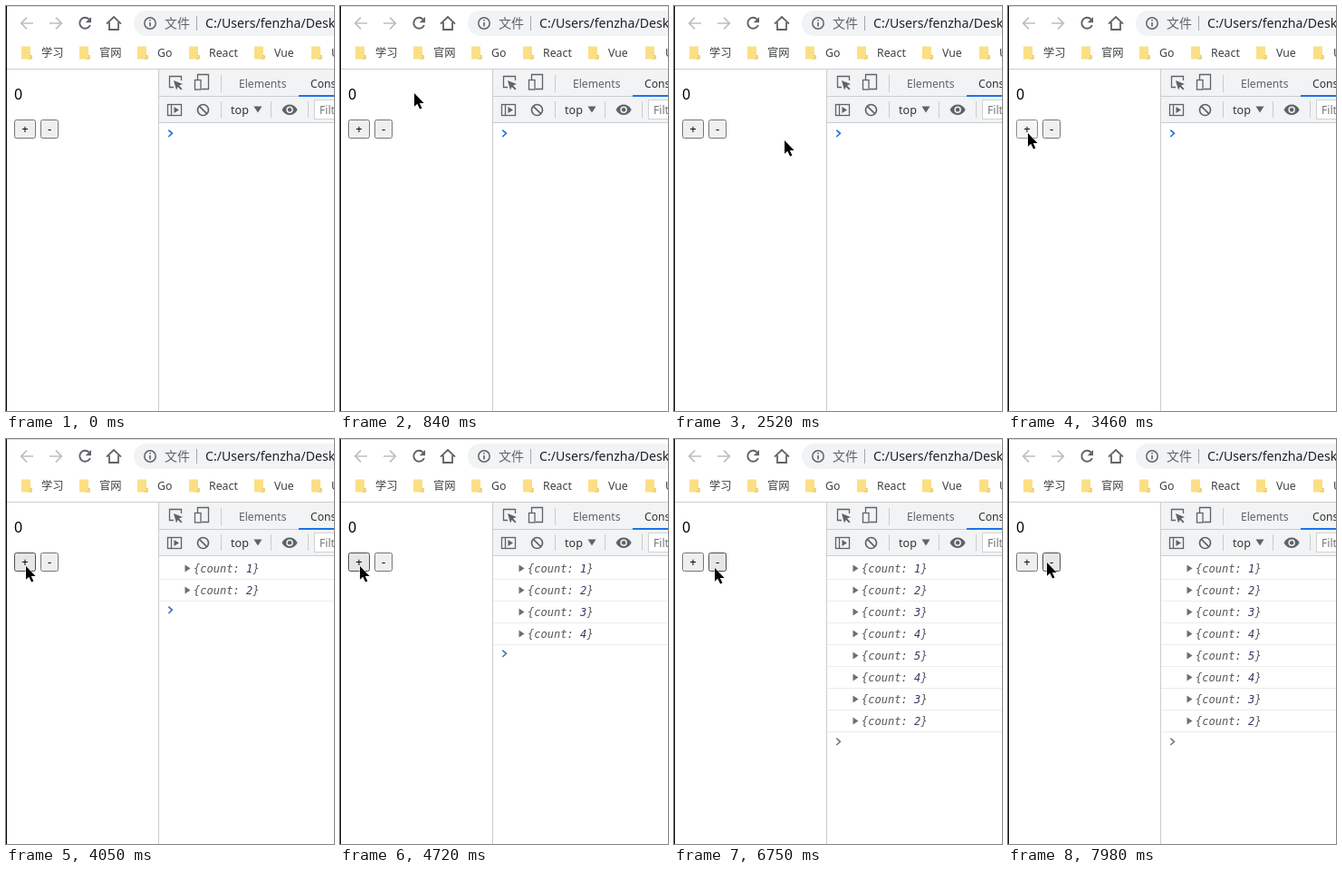
Write an HTML page that moves like this. It is 362 by 446 pixels and loops after 8 s.

```html
<!DOCTYPE html>
<html lang="zh">
<head>
<meta charset="utf-8">
<title>Counter</title>
<style>
html, body { margin: 0; width: 100%; height: 100%; overflow: hidden; background: #fff; }
svg { display: block; width: 100vw; height: 100vh; }
text { font-family: "Noto Sans", "Open Sans", "Noto Sans CJK SC", "Noto Sans CJK", sans-serif; white-space: pre; }
.ui { font-size: 12.1px; fill: #5f6368; }
.mark { font-size: 12.3px; fill: #3c4043; }
.btn rect { fill: #efefef; stroke: #767676; }
.btn.hover rect { fill: #e6e6e6; stroke: #4f4f4f; }
.btn.down rect { fill: #f5f5f5; stroke: #8d8d8d; }
.btn text { font-size: 13px; text-anchor: middle; }
.log text { font: italic 12.07px "DejaVu Sans Mono", "Noto Sans Mono", monospace; fill: #565656; }
.log tspan { fill: #3a3a68; }
.line { fill: none; stroke: #5f6368; }
</style>
</head>
<body>
<svg viewBox="0 0 362 446" preserveAspectRatio="none">
  <rect width="362" height="446" fill="#fff"/>

  <!-- browser toolbar -->
  <rect width="362" height="1" fill="#dadada"/>
  <g class="line" stroke-width="1.7">
    <path stroke="#bcbec1" d="M30 19H17M23 12.7L16.7 19L23 25.3"/>
    <path stroke="#bcbec1" d="M48 19H61M55 12.7L61.3 19L55 25.3"/>
  </g>
  <circle id="halo" cx="87.5" cy="19.5" r="14" fill="#e9eaec"/>
  <circle id="ripple" cx="92" cy="18" r="12" fill="#d9dbde"/>
  <path class="line" stroke-width="1.9" d="M91.6 14.6A6 6 0 1 0 92.9 21"/>
  <path fill="#5f6368" d="M94 12V18.3H87.7Z"/>
  <path class="line" stroke-width="1.8" d="M111 19.7L119 12L127 19.7M114 18V26H124V18"/>
  <path fill="#f1f3f4" d="M362 5H155A14 14 0 0 0 155 33H362Z"/>
  <circle class="line" cx="159" cy="19" r="6.2" stroke-width="1.5"/>
  <path class="line" stroke-width="1.6" d="M159 18V22.6M159 15V16.6"/>
  <text x="175" y="24" font-size="14" fill="#5f6368">文件</text>
  <rect x="210" y="11" width="1" height="16" fill="#a4a7ab"/>
  <text x="220" y="24" font-size="14.1" fill="#202124">C:/Users/fenzha/Desktop/</text>
  <g id="marks"></g>
  <rect y="69" width="362" height="1" fill="#cfcfcf"/>

  <!-- page -->
  <text x="9" y="103" font-size="16" fill="#000">0</text>
  <g class="btn" id="plus"><rect x="9.5" y="125.5" width="23" height="20" rx="2"/><text x="21" y="140">+</text></g>
  <g class="btn" id="minus"><rect x="38.5" y="125.5" width="19" height="20" rx="2"/><text x="48" y="140">-</text></g>

  <!-- developer tools -->
  <rect x="168" y="70" width="194" height="59" fill="#f1f3f4"/>
  <rect x="168" y="70" width="1" height="376" fill="#cacdd1"/>
  <path stroke="#cacdd1" d="M169 99.5H362M169 128.5H362M237.5 76V95M237.5 105V123M292.5 105V123M333.5 105V123"/>
  <rect x="323" y="98" width="39" height="2" fill="#1a73e8"/>
  <g class="line" stroke-width="1.3">
    <path d="M185 89.5H180.5V77.5H193.5V82"/>
    <path d="M211.5 81V75.5H223.5V91.5H216"/>
    <rect x="208.5" y="81.5" width="6.5" height="10.5"/>
    <rect x="178.5" y="108.5" width="15" height="12"/>
    <path d="M182.5 108.5V120.5"/>
    <circle cx="217.5" cy="114.5" r="6" stroke-width="1.7"/>
    <path stroke-width="1.7" d="M213.3 110.3L221.7 118.7"/>
  </g>
  <g fill="#5f6368">
    <path d="M185 82L195 86L191 87.6L194.5 91.2L193.2 92.4L189.7 88.9L188 92.5Z"/>
    <path d="M185.5 111V118L191 114.5Z"/>
    <path d="M273.5 110.5H282.5L278 117.5Z"/>
    <path d="M304.5 114.3C308 106.6 318 106.6 321.7 114.3C318 122 308 122 304.5 114.3Z"/>
  </g>
  <circle cx="313.1" cy="114.3" r="3" fill="#5f6368" stroke="#f1f3f4" stroke-width="1.5"/>
  <text class="ui" x="257" y="90">Elements</text>
  <text class="ui" x="336" y="90" style="fill:#333">Console</text>
  <text class="ui" x="248" y="119" style="fill:#333;font-size:12.6px">top</text>
  <rect x="340.5" y="103.5" width="40" height="21" fill="#fff" stroke="#d0d3d6"/>
  <text class="ui" x="346" y="119" style="fill:#757575">Filter</text>

  <g id="logs"></g>
  <path id="prompt" fill="none" stroke-width="1.6" d="M179.3 -3.7L183.4 0L179.3 3.7"/>

  <rect width="1" height="446" fill="#000"/>
  <path id="cursor" d="M0 0V14.8L3.3 11.8L6.1 17.6L8.4 16.6L5.8 10.9H10.6Z" fill="#000" stroke="#fff" paint-order="stroke"/>
</svg>
<script>
const LOOP = 8000, STEP = 70, HOLD = 130;
const $ = id => document.getElementById(id);
const rowY = i => Math.floor(i * 24.14);

const marks = { 学习: 17, 官网: 81, Go: 145, React: 202, Vue: 274, U: 337 };
$('marks').innerHTML = Object.entries(marks).map(([name, x]) => `
  <path d="M${x} 44.5h10v10.5h1.5v3.5h-11.5z" fill="#fbdf84"/>
  <path d="M${x + 9.5} 54.5h1.7v3.5h-3.5" fill="none" stroke="#e6c05a"/>
  <text class="mark" x="${x + 22}" y="56">${name}</text>`).join('');

// each press logs once it is let go: five up, then down
const presses = [3460, 3920, 4250, 4585, 4990, 6150, 6350, 6620];
$('logs').innerHTML = presses.map((_, i) => `
  <g class="log" transform="translate(0 ${rowY(i)})">
    <path d="M197.5 138.5v8l6-4z" fill="#6e6e6e"/>
    <text x="207" y="147">{count: <tspan>${5 - Math.abs(4 - i)}</tspan>}</text>
    <rect x="169" y="154" width="193" height="1" fill="#ececec"/>
  </g>`).join('');
const logs = [...document.querySelectorAll('.log')];

// pointer moves: start, duration, target x, y
const moves = [
  [90, 70, 286, 361],
  [350, 840, 39, 40],
  [1190, 140, 86, 9],
  [1400, 70, 92, 19],
  [1890, 490, 147, 150],
  [2380, 140, 122, 148],
  [2520, 210, 48, 165],
  [2730, 350, 22, 140],
  [5120, 210, 43, 145],
  [5610, 140, 45, 142],
  [6810, 280, 10, 140],
  [7290, 140, 15, 138],
  [7770, 210, 43, 136]
];

function tip(t) {
  let x = 297, y = 375;
  for (const [start, dur, tx, ty] of moves) {
    if (t < start) break;
    const k = Math.min(1, Math.floor((t - start) / STEP) * STEP / dur);
    const ease = k * (2 - k);
    x += (tx - x) * ease;
    y += (ty - y) * ease;
  }
  return [Math.round(x), Math.round(y)];
}

const show = (el, on) => { el.style.display = on ? '' : 'none'; };

function setButton(id, inside, down) {
  $(id).setAttribute('class', 'btn' + (inside ? down ? ' down' : ' hover' : ''));
}

function draw(t) {
  const [x, y] = tip(t);
  const seen = t >= 70;
  const over = (l, r) => seen && x >= l && x < r && y >= 125 && y < 146;
  const down = presses.some(p => t >= p && t < p + HOLD);
  const count = presses.filter(p => t >= p + HOLD).length;

  show($('cursor'), seen);
  $('cursor').setAttribute('transform', `translate(${x} ${y})`);
  show($('halo'), seen && Math.hypot(x - 87.5, y - 19.5) < 14);
  show($('ripple'), t >= 1740 && t < 1810);
  setButton('plus', over(9, 33), down);
  setButton('minus', over(38, 58), down);
  logs.forEach((g, i) => show(g, i < count));
  $('prompt').setAttribute('transform', `translate(0 ${140.3 + rowY(count)})`);
  $('prompt').setAttribute('stroke', `hsl(212, ${78 - 9 * count}%, 48%)`);
}

const start = performance.now();
function tick() {
  draw((performance.now() - start) % LOOP);
  requestAnimationFrame(tick);
}
draw(0);
requestAnimationFrame(tick);
</script>
</body>
</html>
```
